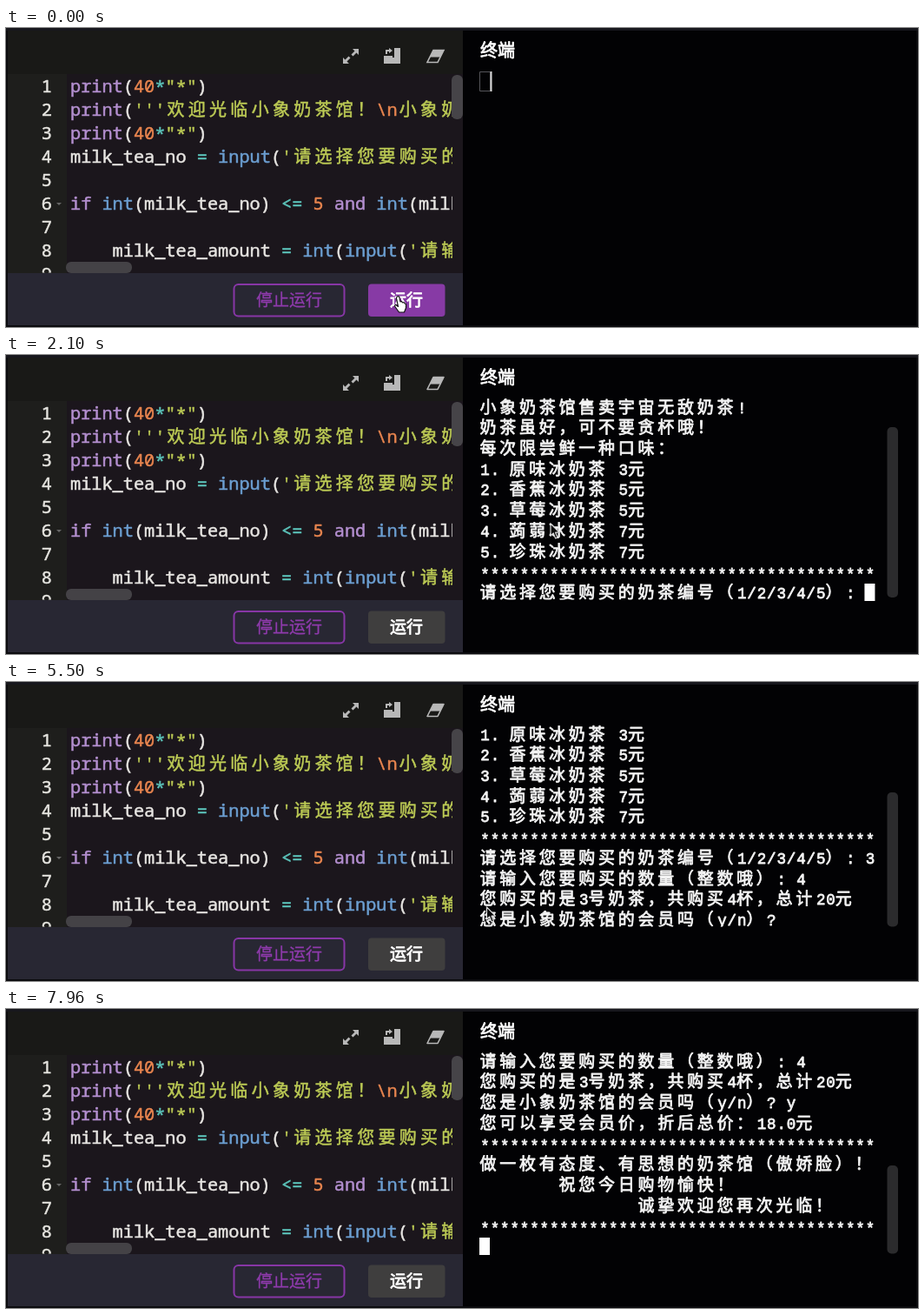
An HTML page with a canvas for the animation above (8 s loop, 1050 px wide and 344 px high).

```html
<!DOCTYPE html>
<html lang="zh-CN">
<head>
<meta charset="utf-8">
<style>
  html, body { margin: 0; width: 100%; height: 100%; overflow: hidden; background: #020204; }
  canvas { display: block; }
</style>
</head>
<body>
<canvas id="stage" width="1050" height="344"></canvas>
<script>
const ctx = document.getElementById('stage').getContext('2d');
const LOOP = 8000;
const CJK = '"Noto Sans CJK SC", "Noto Sans CJK", sans-serif';
const isWide = ch => ch > '\u2fff';

const CODE = [
  'print(40*"*")',
  "print('''欢迎光临小象奶茶馆！\\n小象奶茶馆",
  'print(40*"*")',
  "milk_tea_no = input('请选择您要购买的奶茶",
  '',
  'if int(milk_tea_no) <= 5 and int(milk_tea_no)',
  '',
  "    milk_tea_amount = int(input('请输入您",
  ''
];
// Capture groups: escape, string, number, keyword, builtin, operator
const TOKEN = /(\\n)|("[^"]*"|'+|[\u3000-\uffef]+)|(\d+)|\b(print|if|and)\b|\b(int|input)\b|(<=|=|\*)|./g;
const TOKEN_COLORS = ['#e8854f', '#bdcb55', '#e8854f', '#b48fd0', '#6c9fd2', '#5cc4bb'];

const STARS = '*'.repeat(40);
const INTRO = [
  STARS, '欢迎光临小象奶茶馆！', '小象奶茶馆售卖宇宙无敌奶茶!', '奶茶虽好，可不要贪杯哦！',
  '每次限尝鲜一种口味：', '1. 原味冰奶茶 3元', '2. 香蕉冰奶茶 5元', '3. 草莓冰奶茶 5元',
  '4. 蒟蒻冰奶茶 7元', '5. 珍珠冰奶茶 7元', STARS
];
const OUTRO = [
  '您可以享受会员价，折后总价：18.0元', STARS, '做一枚有态度、有思想的奶茶馆（傲娇脸）！',
  ' '.repeat(8) + '祝您今日购物愉快！', ' '.repeat(16) + '诚挚欢迎您再次光临！', STARS, ''
];

const THUMB_TOPS = [[800, 62], [2000, 83], [3360, 103], [4830, 127], [7960, 180]];
const BLOCK_ON = [[2000, 2700], [3360, 3860], [4330, 5330], [5830, 6330], [6830, 7860], [7960, LOOP]];
const MOUSE = [
  [660, 450, 309], [1000, 627, 194], [2130, 627, 194], [2230, 745, 202], [4830, 745, 202],
  [5330, 553, 259], [5500, 553, 259], [6300, 924, 259], [6560, 958, 259], [6960, 979, 259]
];

function rect(x, y, w, h, color) {
  ctx.fillStyle = color;
  ctx.fillRect(x, y, w, h);
}

function pill(x, y, w, h, r, fill, stroke) {
  ctx.beginPath();
  ctx.roundRect(x, y, w, h, r);
  if (fill) { ctx.fillStyle = fill; ctx.fill(); }
  if (stroke) { ctx.strokeStyle = stroke; ctx.lineWidth = 2; ctx.stroke(); }
}

function shape(path, x, y, fill, stroke, width = 1) {
  const p = new Path2D(path);
  ctx.save();
  ctx.translate(x, y);
  if (fill) { ctx.fillStyle = fill; ctx.fill(p); }
  if (stroke) { ctx.strokeStyle = stroke; ctx.lineWidth = width; ctx.stroke(p); }
  ctx.restore();
}

// A thin outline of the given weight thickens the regular face.
function label(text, x, y, font, color, align = 'left', weight = 0) {
  ctx.font = font;
  ctx.fillStyle = ctx.strokeStyle = color;
  ctx.textAlign = align;
  ctx.lineJoin = 'round';
  ctx.fillText(text, x, y);
  if (weight) {
    ctx.lineWidth = weight;
    ctx.strokeText(text, x, y);
  }
}

function clipped(x, y, w, h, draw) {
  ctx.save();
  ctx.beginPath();
  ctx.rect(x, y, w, h);
  ctx.clip();
  draw();
  ctx.restore();
}

const columns = text => [...text].reduce((n, ch) => n + (isWide(ch) ? 2 : 1), 0);

// Draws on a character grid, wide characters taking two cells; returns the next column.
function gridText(text, col, x, y, grid, color) {
  for (const ch of text) {
    const wide = isWide(ch);
    label(ch, x + col * grid.cell + (wide ? grid.wideShift : grid.narrowShift),
      y + (ch === '*' ? grid.starDrop : 0), wide ? grid.wide : grid.narrow, color, 'left', grid.weight);
    col += wide ? 2 : 1;
  }
  return col;
}

const EDITOR_GRID = {
  cell: 12.15, wideShift: 2.1, narrowShift: 0, starDrop: 1, weight: 0.5,
  narrow: '20.25px "Noto Sans Mono", monospace', wide: '20px ' + CJK
};
const TERM_GRID = {
  cell: 11.37, wideShift: 0.2, narrowShift: 1, starDrop: 2, weight: 0.8,
  narrow: '17.5px "Liberation Mono", monospace', wide: '19px ' + CJK
};

function drawIcons() {
  const c = '#b8b8b8';
  shape('M11 1H18V8L15.5 5.5L11.5 9.5L9.5 7.5L13.5 3.5ZM7 18H0V11L2.5 13.5L6.5 9.5L8.5 11.5L4.5 15.5Z', 388, 23, c);
  shape('M0 9H10V11H12V0H19V18H0ZM2 7V2H6V0L10 3L6 6V4H4V7Z', 435, 23, c);
  shape('M8 1H20L13 15H1Z', 484, 24.5, null, c, 1.6);
  shape('M8 1H20L16 9H4Z', 484, 24.5, c);
}

function drawEditor(t) {
  rect(2, 3, 524, 50, '#191917');
  rect(2, 53, 68, 229, '#1e1e1c');
  rect(70, 53, 456, 229, '#1b161c');
  rect(2, 282, 524, 60, '#282733');
  drawIcons();
  clipped(2, 53, 512, 228.5, () => {
    CODE.forEach((line, i) => {
      const y = 74.4 + i * 26.9;
      label(i + 1, 53, y, EDITOR_GRID.narrow, '#e6e5e0', 'right', EDITOR_GRID.weight);
      let col = 0;
      for (const m of line.matchAll(TOKEN)) {
        const kind = m.slice(1).findIndex(Boolean);
        col = gridText(m[0], col, 74, y, EDITOR_GRID, TOKEN_COLORS[kind] || '#e8e6e3');
      }
    });
  });
  shape('M0 0H6L3 3Z', 58, 201, '#666');
  pill(513, 54, 13, 51, 6, '#464448');
  pill(69, 269, 76, 13, 6, '#444246');

  pill(262.5, 295, 127, 36.5, 5, null, '#8736a6');
  label('停止运行', 326, 320.3, '19px ' + CJK, '#8f3bad', 'center', 0.3);
  pill(417, 294.5, 88.5, 37.5, 4, t < 280 ? '#873aa5' : '#3f3e3e');
  label('运行', 461, 320.3, '19px ' + CJK, '#fff', 'center', 0.8);
}

function terminalLines(t) {
  const lines = t < 800 ? [] : [...INTRO];
  if (t >= 2000) lines.push('请选择您要购买的奶茶编号（1/2/3/4/5）: ' + (t >= 2960 ? '3' : ''));
  if (t >= 3360) lines.push('请输入您要购买的数量（整数哦）: ' + (t >= 4330 ? '4' : ''));
  if (t >= 4830) lines.push('您购买的是3号奶茶，共购买4杯，总计20元',
    '您是小象奶茶馆的会员吗（y/n）? ' + (t >= 7360 ? 'y' : ''));
  if (t >= 7960) lines.push(...OUTRO);
  return lines.slice(-10);
}

function drawTerminal(t) {
  rect(526, 3, 522, 339, '#020204');
  label('终端', 546, 33, '20px ' + CJK, '#fff', 'left', 0.8);
  const lines = terminalLines(t);
  if (!lines.length) {
    ctx.lineWidth = 1;
    ctx.strokeStyle = '#55555a';
    ctx.strokeRect(545.5, 50.5, 12, 22);
    rect(557.5, 50, 2, 23, '#d8d8d8');
    return;
  }
  clipped(540, 48, 480, 233.5, () =>
    lines.forEach((line, i) => gridText(line, 0, 545.3, 66.6 + i * 23.7, TERM_GRID, '#f4f4f4')));
  if (BLOCK_ON.some(([a, b]) => t >= a && t < b))
    rect(545 + columns(lines.at(-1)) * TERM_GRID.cell, 263, 12, 20, '#fff');
  const top = THUMB_TOPS.findLast(([at]) => t >= at)[1];
  pill(1014.5, top, 12.5, Math.min(196, 281.5 - top), 5, '#2b2b2d');
}

function drawMouse(t) {
  if (t < 660) {
    shape('M3 0Q5 -1 5.5 1L6.5 6L8 5.5L9 7L10.5 6.5L11.5 8L13 8.5V13L11 18H5L0 11Q0 9 2 10L4 11.5L2 2Q2 .5 3 0Z',
      447.5, 309, '#fff', '#111', 1.2);
    return;
  }
  if ((t >= 2900 && t < 4830) || t >= 7260) return;
  const next = MOUSE.findIndex(p => p[0] > t);
  let [, x, y] = MOUSE.at(-1);
  if (next > 0) {
    const [t0, x0, y0] = MOUSE[next - 1], [t1, x1, y1] = MOUSE[next];
    const k = (t - t0) / (t1 - t0);
    x = x0 + (x1 - x0) * k;
    y = y0 + (y1 - y0) * k;
  }
  shape('M0 0V14L3.2 11L5.6 17L8 16L5.6 10.2H10Z', x, y, '#0a0a0a', '#d8d8d8', 1.2);
}

function frame(now) {
  const t = now % LOOP;
  rect(0, 0, 1050, 344, '#0b0b0e');
  rect(0, 0, 1050, 3, '#17171d');
  drawEditor(t);
  drawTerminal(t);
  drawMouse(t);
  requestAnimationFrame(frame);
}
requestAnimationFrame(frame);
</script>
</body>
</html>
```
